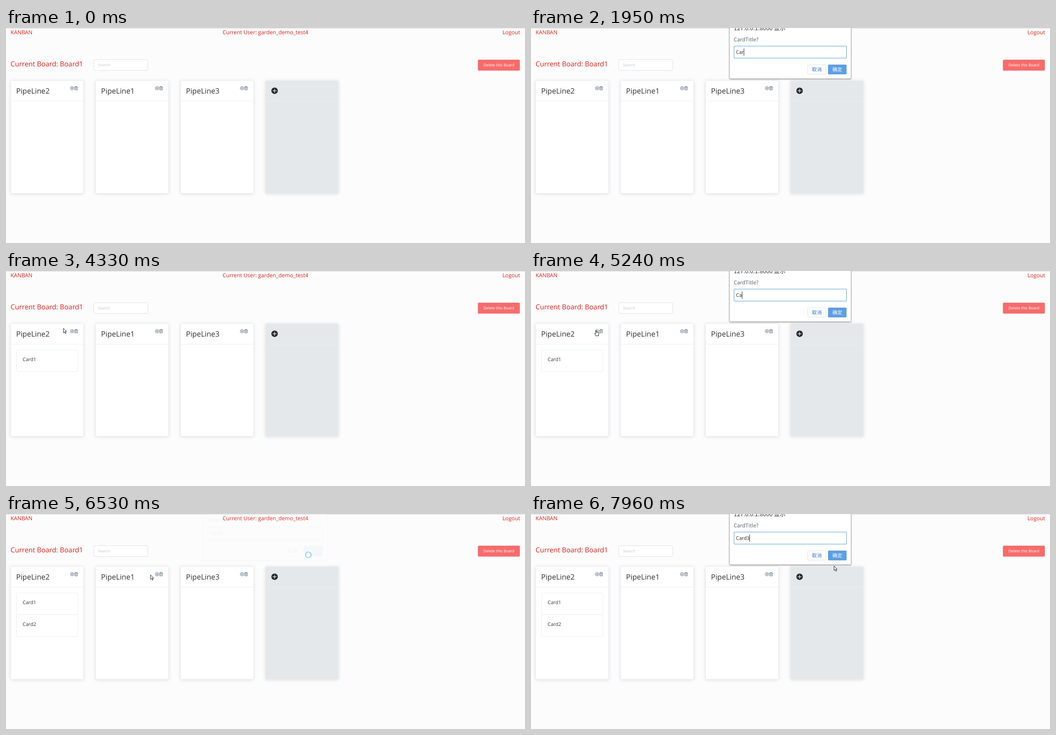
Animation of 1162x482 px, one loop 8000 ms. Source, as an HTML page:

```html
<!DOCTYPE html>
<html lang="en">
<head>
<meta charset="utf-8">
<title>Kanban board</title>
<style>
  html, body { margin: 0; width: 100%; height: 100%; overflow: hidden; background: #fcfcfc; }
  svg { display: block; width: 1162px; height: 482px; }
  text { font-family: "Open Sans", "Noto Sans", sans-serif; text-rendering: geometricPrecision; white-space: pre; }
  .red { fill: #d9221c; }
  .nav { font-size: 12.2px; }
  .small { font-size: 8.58px; }
  .title { font-size: 16.5px; fill: #303133; }
  .label { font-size: 10.9px; fill: #303133; }
  .panel { stroke: #ebeef5; filter: drop-shadow(0 1.2px 3.7px rgba(0, 0, 0, .12)); }
  .card { fill: #fff; stroke: #ebeef5; }
  .hover .card { filter: drop-shadow(0 1.2px 3.7px rgba(0, 0, 0, .12)); }
  .icon { fill: none; stroke: #566579; stroke-width: .9; }
  #dialog text { font-family: "Noto Sans CJK SC", "Noto Sans CJK", "Noto Sans", sans-serif; }
  #sheet { fill: #fff; stroke: #b9babc; filter: drop-shadow(0 1px 1.5px rgba(0, 0, 0, .4)); }
  .pointer { fill: #fff; stroke: #1b1b1b; stroke-linejoin: round; }
</style>
</head>
<body>
<svg viewBox="0 0 1162 482">
  <defs>
    <g id="tools" class="icon">
      <circle r="3.8"/>
      <path d="M-2.1 0H2.1M0-2.1V2.1"/>
      <path d="M5-2.5H13M7.5-2.5V-4H10.5V-2.5M6-2.5V3.8H12V-2.5M8.1-.7V2.2M9.9-.7V2.2"/>
    </g>
  </defs>
  <rect width="1162" height="482" fill="#fcfcfc"/>
  <rect width="1162" height="1" fill="#dadada"/>
  <g class="red nav">
    <text x="10.3" y="14">KANBAN</text>
    <text x="485" y="14">Current User: garden_demo_test4</text>
    <text x="1151" y="14" text-anchor="end">Logout</text>
  </g>
  <text class="red" x="10.3" y="86" font-size="15.4">Current Board: Board1</text>
  <rect x="196.5" y="71" width="121" height="24" rx="2.5" fill="#fff" stroke="#dcdfe6"/>
  <text class="small" x="206" y="86" fill="#c0c4cc">Search</text>
  <rect x="1056.5" y="71" width="94" height="24.5" rx="2.5" fill="#f56c6c"/>
  <text class="small" x="1069" y="86.2" fill="#fff">Delete this Board</text>

  <g id="board"></g>

  <g id="dialog">
    <rect id="sheet" x="444.5" y="-60" width="272" height="173.5" rx="2"/>
    <text x="454" y="5" font-size="13.05" fill="#333">127.0.0.1:8000 显示</text>
    <text x="454" y="29.6" font-size="11.7" fill="#5a646e">CardTitle?</text>
    <rect x="454.5" y="40.5" width="252" height="27" rx="1.5" fill="#fff" stroke="#5b9bd5"/>
    <text id="entry" x="459" y="58" font-size="10.9" fill="#333"></text>
    <rect id="caret" y="46" width="1" height="16" fill="#222"/>
    <rect x="619.5" y="82.5" width="41" height="21" rx="2" fill="#fff" stroke="#dfe2e6"/>
    <text x="640" y="97" font-size="11" fill="#2f74d0" text-anchor="middle">取消</text>
    <rect x="665" y="82" width="41.5" height="22" rx="2" fill="#5e9fe0"/>
    <text x="685.7" y="97" font-size="11" fill="#fff" text-anchor="middle">确定</text>
  </g>

  <circle id="ring" r="6.3" fill="none" stroke="#62bfe8" stroke-width="1.3"/>
  <path id="arrow" class="pointer" d="M.5.5V10.6L2.9 8.4L4.7 12.2L6.3 11.4L4.6 7.8H7.5Z"/>
  <path id="hand" class="pointer" d="M-1 6V1.2Q0-.3 1 1.2V4.4L5.4 5.4Q6.4 5.8 6.2 7L5.5 10V12.3H-1.3V10.6L-4 7.4Q-3.6 5.8-2.4 6.6L-1 7.8Z"/>
</svg>
<script>
const LOOP = 8000;
const $ = id => document.getElementById(id);
const board = $("board");

const CARDS = [
  { label: "Card1", at: 2500 },
  { label: "Card2", at: 6480 },
];
const PROMPTS = [
  { open: 780, word: "Card1", keys: [1670, 1770, 1950, 2140, 2240], close: 2350 },
  { open: 4580, word: "Card2", keys: [5130, 5220, 5330, 5430, 5560], close: 6350 },
  { open: 7090, word: "Card3", keys: [7550, 7620, 7710, 7810, 7930], close: 9000 },
];
// time, x, y
const CLICKS = [[760, 145, 135], [4540, 145, 135], [6290, 677, 91.5], [7050, 340, 134]];
const PATH = [
  [2980, 179, 118], [3160, 232, 103], [3400, 305, 148], [3580, 334, 146],
  [3730, 334, 146], [3980, 118, 190], [4120, 104, 186], [4330, 128, 128],
  [4490, 146, 133], [5560, 146, 133], [5800, 390, 138], [6150, 660, 110],
  [6270, 677, 91.5], [6370, 677, 91.5], [6530, 323, 136], [6760, 342, 134],
  [7600, 342, 134], [7950, 678, 116],
];

function buildBoard() {
  let html = "";
  ["PipeLine2", "PipeLine1", "PipeLine3", ""].forEach((name, i) => {
    const x = 10.7 + 190.15 * i;
    html += `<g transform="translate(${x} 0)">
      <rect class="panel" y="118" width="163" height="252.5" rx="1.5" fill="${name ? "#fff" : "#e4e8eb"}"/>
      <path d="M0 164H163" stroke="${name ? "#ebeef5" : "#e9ecf0"}"/>`;
    html += name
      ? `<text class="title" x="12" y="147">${name}</text><use href="#tools" x="137.3" y="135"/>`
      : `<circle cx="20.2" cy="140.7" r="7.2" fill="#25292e"/>
         <path d="M16 140.7H24.4M20.2 136.5V144.9" stroke="#fff" stroke-width="1.2"/>`;
    html += "</g>";
  });
  CARDS.forEach((card, i) => {
    card.y = 177 + 49 * i;
    html += `<g id="card${i}"><rect class="card" x="23.5" y="${card.y}" width="137.5" height="48.5" rx="2"/>
      <text class="label" x="37.3" y="${card.y + 25}">${card.label}</text></g>`;
  });
  board.innerHTML = html;
}

const clamp = v => Math.min(1, Math.max(0, v));
const show = (node, on) => node.setAttribute("visibility", on ? "visible" : "hidden");
const move = (node, x, y) => node.setAttribute("transform", `translate(${x} ${y})`);

function pointerAt(t) {
  if (t < PATH[0][0]) return null;
  const i = PATH.findIndex(p => p[0] > t);
  if (i < 0) return PATH[PATH.length - 1].slice(1);
  const [t0, x0, y0] = PATH[i - 1], [t1, x1, y1] = PATH[i];
  const k = (t - t0) / (t1 - t0);
  return [x0 + (x1 - x0) * k, y0 + (y1 - y0) * k];
}

function drawDialog(t) {
  const p = PROMPTS.find(p => t >= p.open && t < p.close + 210);
  show($("dialog"), p);
  show($("caret"), false);
  if (!p) return;
  const away = t < p.close ? 1 - clamp((t - p.open) / 220) : clamp((t - p.close) / 210);
  const s = 1 + .025 * away;
  $("dialog").setAttribute("opacity", (1 - away) ** 1.5);
  $("dialog").setAttribute("transform", `translate(${580.5 * (1 - s)} ${-14 * away}) scale(${s})`);

  const typed = p.keys.filter(k => k <= t);
  const last = typed.length ? typed[typed.length - 1] : p.open - 60;
  const entry = $("entry");
  entry.textContent = p.word.slice(0, typed.length);
  $("caret").setAttribute("x", 459 + (typed.length ? entry.getComputedTextLength() : 0));
  show($("caret"), t < p.close && Math.floor((t - last) / 500) % 2 === 0);
}

function drawPointer(t) {
  const pos = pointerAt(t);
  const over = (x, y, w, h) => pos && pos[0] > x && pos[0] < x + w && pos[1] > y && pos[1] < y + h;
  const link = over(142, 130, 10, 10) || over(334, 130, 10, 10);
  show($("arrow"), pos && !link);
  show($("hand"), link);
  if (pos) move(link ? $("hand") : $("arrow"), ...pos);

  CARDS.forEach((card, i) => {
    const node = $("card" + i);
    show(node, t >= card.at);
    node.classList.toggle("hover", !!over(23, card.y, 138, 49));
  });
  const click = CLICKS.find(c => t >= c[0] && t < c[0] + 280);
  show($("ring"), click);
  if (click) move($("ring"), click[1], click[2]);
}

function draw(now) {
  const t = now % LOOP;
  drawDialog(t);
  drawPointer(t);
}

buildBoard();
const start = performance.now();
function tick() {
  draw(performance.now() - start);
  requestAnimationFrame(tick);
}
tick();
</script>
</body>
</html>
```
